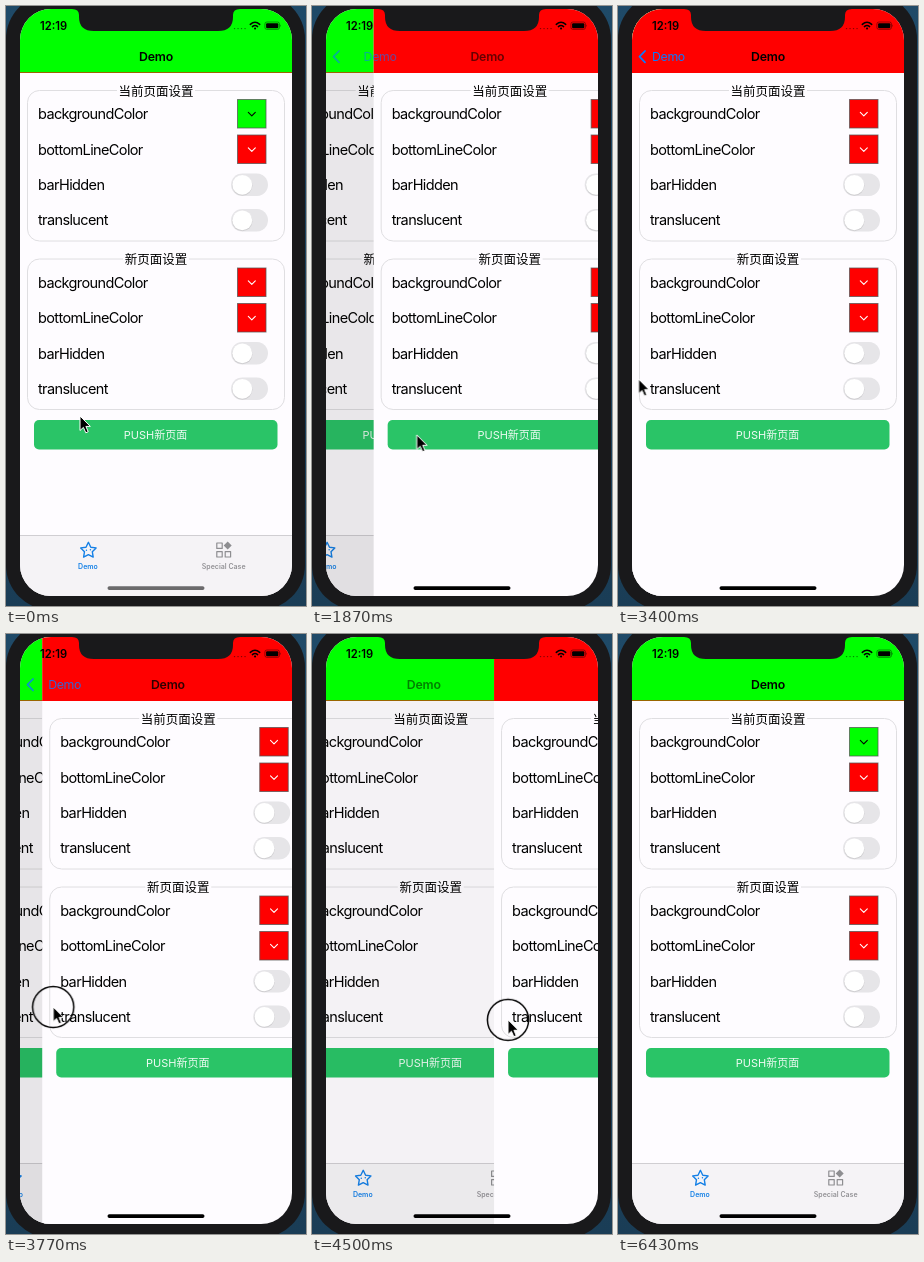
An HTML page for the animation above (6.46 s loop, 300 by 600 pixels).

```html
<!DOCTYPE html>
<html lang="zh-CN">
<head>
<meta charset="utf-8">
<title>Navigation bar demo</title>
<style>
/* --p: 1 = home page in place, 0 = pushed page in place */
@property --p { syntax: "<number>"; inherits: true; initial-value: 1; }
@property --tap { syntax: "<number>"; inherits: true; initial-value: 1; }

html, body { margin: 0; width: 100%; height: 100%; overflow: hidden; background: #18384f; }
svg { display: block; width: 300px; height: 600px; }
text { font-family: Inter, "Noto Sans CJK SC", "Noto Sans CJK", sans-serif; }

.screen { animation: slide 6460ms linear infinite, tap 6460ms linear infinite; }
.home { --tint: #0f0; --mark: #000; transform: translateX(calc(-81.6px * (1 - var(--p)))); }
.pushed { transform: translateX(calc(272px * var(--p))); }
.pushed, .red { --tint: #f00; --mark: #fff; }
.dim { opacity: calc(.1 * (1 - var(--p))); }

.label { font-size: 14.5px; letter-spacing: -.62px; }
.legend { font-size: 12.5px; }
.mid, .legend, .title, .back { text-anchor: middle; }
.title { font-size: 12.3px; font-weight: 600; letter-spacing: -.2px; }
.back { font-size: 12.3px; letter-spacing: -.35px; fill: #0a7aff; }
.push { font-size: 11px; fill: #fff; opacity: calc(.92 * var(--tap)); }
.tab { font-size: 7px; font-weight: 600; }
.time { font-size: 11.2px; font-weight: 600; }
.line { fill: none; stroke-linecap: round; stroke-linejoin: round; }

.leaving { opacity: calc(1 - 2.3 * var(--p)); }
.old-title { opacity: calc(1.45 * var(--p) - .4); }
.from-left { transform: translateX(calc(100px * var(--p))); }
.to-right { transform: translateX(calc(145px * var(--p))); }

.indicator { animation: indicator 6460ms step-end infinite; }
.pointer { animation: pointer 6460ms ease-in-out infinite; }
.touch { animation: touch 6460ms step-end infinite; }

@keyframes slide {
  0% { --p: 1; }
  26.3% { --p: 1; animation-timing-function: cubic-bezier(.22, .75, .25, 1); }
  34.1% { --p: 0; }
  56.5% { --p: 0; }
  58.36% { --p: .081; }
  64.55% { --p: .375; }
  72% { --p: .728; animation-timing-function: ease-out; }
  76.6%, 100% { --p: 1; }
}
@keyframes tap {
  0%, 21.8% { --tap: 1; }
  22.2%, 25.8% { --tap: .15; }
  29%, 100% { --tap: 1; }
}
@keyframes indicator {
  0% { fill: #6b6a6c; }
  26.3%, 100% { fill: #000; }
}
@keyframes pointer {
  0%, 6.2% { transform: translate(74px, 410px); }
  19.35%, 28.6% { transform: translate(105px, 429px); }
  37.9%, 48.8% { transform: translate(9px, 374px); }
  54.2% { transform: translate(23px, 373px); }
  56.5% { transform: translate(26px, 373px); animation-timing-function: linear; }
  58.36% { transform: translate(47px, 373px); animation-timing-function: linear; }
  64.55% { transform: translate(130px, 381px); animation-timing-function: linear; }
  72%, 82.8% { transform: translate(226px, 388px); }
  89%, 100% { transform: translate(312px, 396px); }
}
@keyframes touch {
  0% { opacity: 0; }
  54.2% { opacity: 1; }
  72%, 100% { opacity: 0; }
}
</style>
</head>
<body>
<svg viewBox="0 0 300 600">
  <defs>
    <linearGradient id="sea" x2="0" y2="1">
      <stop offset="0" stop-color="#1f4a68"/>
      <stop offset="1" stop-color="#1a3d56"/>
    </linearGradient>

    <clipPath id="glass">
      <rect x="14" y="3" width="272" height="587" rx="31"/>
    </clipPath>

    <g id="swatch">
      <rect x="231.5" y="93.5" width="28.5" height="28.5" fill="var(--tint)" stroke="#555" stroke-opacity=".75"/>
      <path class="line" d="M242.3 106.3l3.5 3.5 3.5-3.5" stroke="var(--mark)" stroke-width="1.1"/>
    </g>

    <g id="switch">
      <rect x="225" y="167.5" width="37" height="22.5" rx="11.25" fill="#e6e5e8"/>
      <circle cx="236.3" cy="179.6" r="10.2" fill="#000" opacity=".1"/>
      <circle cx="236.3" cy="178.8" r="9.9" fill="#fff"/>
    </g>

    <g id="card">
      <rect x="21.5" y="84.5" width="257" height="150.5" rx="12" fill="none" stroke="#dfdee1"/>
      <text class="label" x="32" y="113">backgroundColor</text>
      <text class="label" x="32" y="148.5">bottomLineColor</text>
      <text class="label" x="32" y="184">barHidden</text>
      <text class="label" x="32" y="219.3">translucent</text>
      <use href="#swatch"/>
      <use href="#swatch" class="red" y="35.5"/>
      <use href="#switch"/>
      <use href="#switch" y="35.5"/>
    </g>

    <g id="form">
      <rect x="14" width="272" height="600" fill="#fefcff"/>
      <rect x="14" width="272" height="67" fill="var(--tint)"/>
      <rect x="14" y="66.4" width="272" height=".6" fill="#f00"/>
      <use href="#card"/>
      <use href="#card" class="red" y="168.5"/>
      <path d="M111 84.5h78M117 253h66" stroke="#fefcff" stroke-width="3"/>
      <text class="legend" x="150" y="89.5">当前页面设置</text>
      <text class="legend" x="150" y="258">新页面设置</text>
      <rect x="28" y="414" width="243.5" height="29.5" rx="5" fill="#2ac467"/>
      <text class="push mid" x="149.5" y="433">PUSH新页面</text>
    </g>
  </defs>

  <rect width="300" height="600" fill="url(#sea)"/>
  <rect x="0" y="-12" width="299" height="616" rx="45" fill="#19191b"/>

  <g class="screen" clip-path="url(#glass)">
    <g class="home">
      <use href="#form"/>
      <rect x="14" y="529" width="272" height="61" fill="#f5f3f6"/>
      <path d="M14 529.5h272" stroke="#d0ced2"/>
      <g transform="translate(82.4 544.3)">
        <path class="line" stroke="#1580e6" stroke-width="1.4" d="M0-8L2.4-3 7.7-2.4 3.9 1.4 4.8 6.8 0 4.3-4.8 6.8-3.9 1.4-7.7-2.4-2.4-3z"/>
        <path class="line" stroke="#1580e6" stroke-width="1.4" d="M-2 0h.1M2-.6h.1"/>
      </g>
      <text class="tab mid" x="82" y="562.6" fill="#1580e6">Demo</text>
      <path class="line" stroke="#8e8e91" stroke-width="1.2" d="M210.8 537h5.4v5.4h-5.4zM210.8 545.6h5.4v5.4h-5.4zM219.2 545.6h5.4v5.4h-5.4z"/>
      <path fill="#8e8e91" d="M221.7 535.6l4 4-4 4-4-4z"/>
      <text class="tab mid" x="217.7" y="562.6" fill="#929195">Special Case</text>
      <rect class="dim" x="14" y="67" width="272" height="533"/>
    </g>
    <use class="pushed" href="#form"/>

    <g class="leaving">
      <path class="line" d="M27 45l-5.5 5.7L27 56.4" stroke="#0a7aff" stroke-width="1.8"/>
      <g class="from-left"><text class="back" x="50.5" y="55">Demo</text></g>
      <g class="to-right"><text class="title" x="150" y="55">Demo</text></g>
    </g>
    <g class="old-title">
      <g class="from-left"><text class="title" x="50" y="55">Demo</text></g>
    </g>

    <text class="time" x="34" y="23.6">12:19</text>
    <path class="line" d="M228.5 22.6h.1m3.4 0h.1m3.4 0h.1m3.4 0h.1" stroke="#000" stroke-opacity=".5" stroke-width="1.4"/>
    <g class="line" stroke="#000" stroke-width="1.5">
      <path d="M244.3 18.4q4.7-4.2 9.4 0M246.4 20.6q2.6-2.2 5.2 0"/>
      <path d="M249 22.6h.1" stroke-width="2"/>
    </g>
    <rect x="258.9" y="16" width="14.6" height="7.4" rx="2" fill="none" stroke="#000" stroke-opacity=".5" stroke-width=".8"/>
    <rect x="260.1" y="17.2" width="12.2" height="5" rx="1"/>
    <path d="M274.4 18.3q1.3 1.4 0 2.8z" opacity=".6"/>
    <rect class="indicator" x="101.5" y="580.2" width="97" height="3.8" rx="1.9"/>
  </g>

  <path fill="#19191b" d="M66 0V3Q73 3 73 9V11Q73 25 88 25H212Q227 25 227 11V9Q227 3 234 3V0z"/>

  <g class="pointer">
    <circle class="touch" r="20.6" fill="none" stroke="#000" stroke-width="1.5"/>
    <path d="M0 0V14.5L3.4 11.4 5.8 16.8 8.2 15.7 5.9 10.4H10.3z" stroke="#fff" stroke-linejoin="round"/>
  </g>
</svg>
</body>
</html>
```
